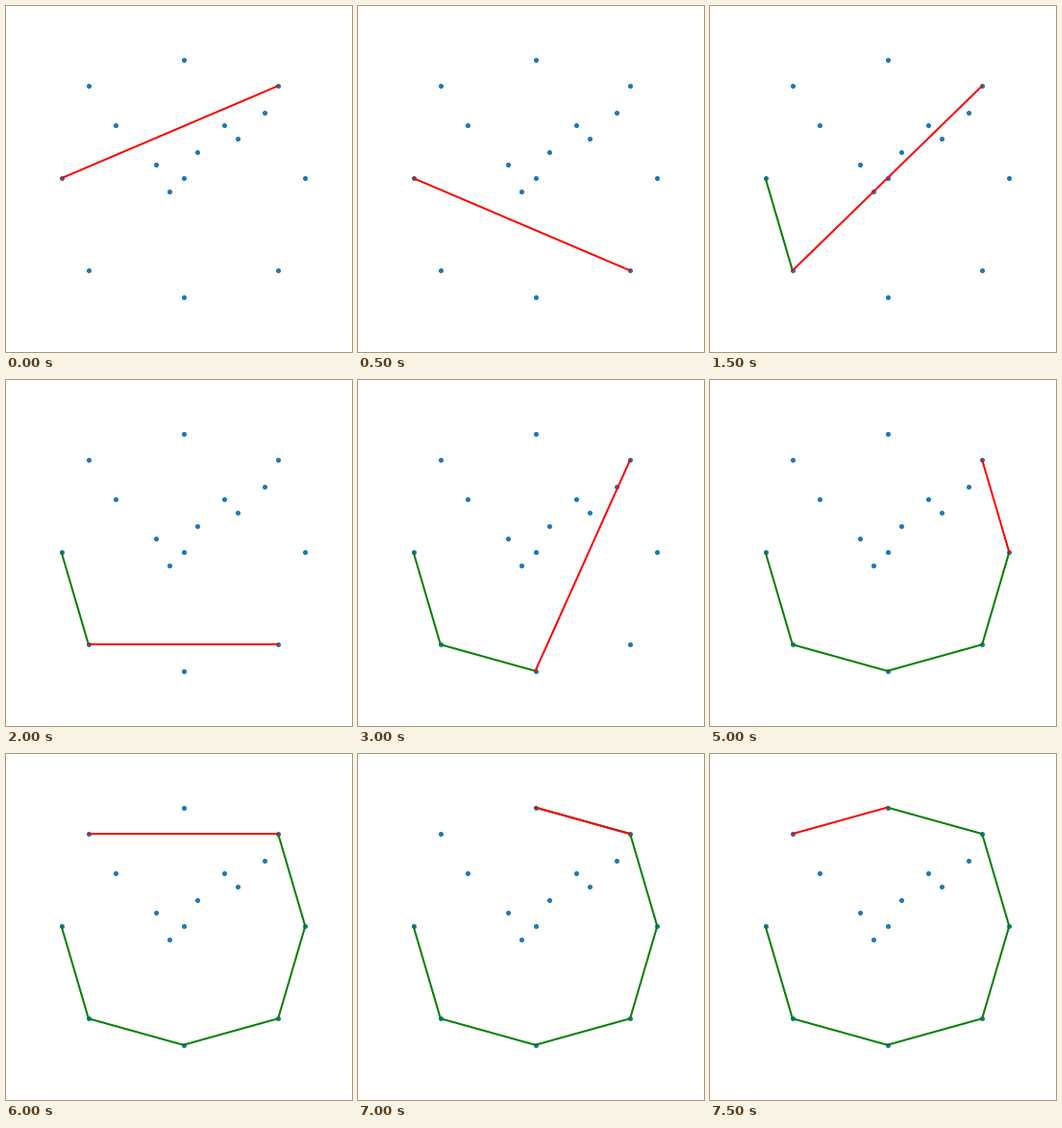
Animation of 360 by 360 pixels, one loop 8000 ms. Source, as a matplotlib script:

```python
import matplotlib.pyplot as plt
from matplotlib.animation import FuncAnimation

N_FRAMES = 16


def make_points():
    """An octagon of corners and axis tips around points on three rays."""
    corners = [(x, y) for y in (7, -7) for x in (7, -7)]
    tips = [p for r in (9, -9) for p in ((r, 0), (0, r))]
    inner = [(x, abs(x) - 1) for x in (-5, -2, 4, 6)]
    inner += [(x, x + 1) for x in (1, 3)]
    inner += [(x, x) for x in (-1, 0)]
    return corners + tips + inner


def is_right(a, b, p):
    """True if p lies to the right of the ray a -> b."""
    return (b[0] - a[0]) * (p[1] - a[1]) < (b[1] - a[1]) * (p[0] - a[0])


def gift_wrap(points):
    """Yield (hull so far, candidate) for each step of the march."""
    start = min(points)
    hull = [start]
    while True:
        current, best = hull[-1], points[0]
        yield list(hull), best
        for p in points:
            if p != current and (best == current or is_right(current, best, p)):
                best = p
                yield list(hull), best
        if best == start:
            return
        hull.append(best)


points = make_points()
steps = [step for _, step in zip(range(N_FRAMES), gift_wrap(points))]

fig = plt.figure(figsize=(5, 5), dpi=72, facecolor="white")
ax = fig.add_axes([0.125, 0.1248, 0.775, 0.755])
ax.set_xlim(-9.9, 9.9)
ax.set_ylim(-9.9, 9.9)
ax.axis("off")

ax.plot(*zip(*points), "o", ms=4, color="tab:blue")
wrap, = ax.plot([], [], color="green", lw=2)
probe, = ax.plot([], [], color="red", lw=2)


def update(i):
    hull, candidate = steps[i]
    wrap.set_data(*zip(*hull))
    probe.set_data(*zip(hull[-1], candidate))
    wrap.set_visible(len(hull) > 1)
    probe.set_visible(candidate != hull[-1])
    return wrap, probe


anim = FuncAnimation(fig, update, frames=len(steps), interval=500,
                     repeat=True, repeat_delay=0)
plt.show()
```
